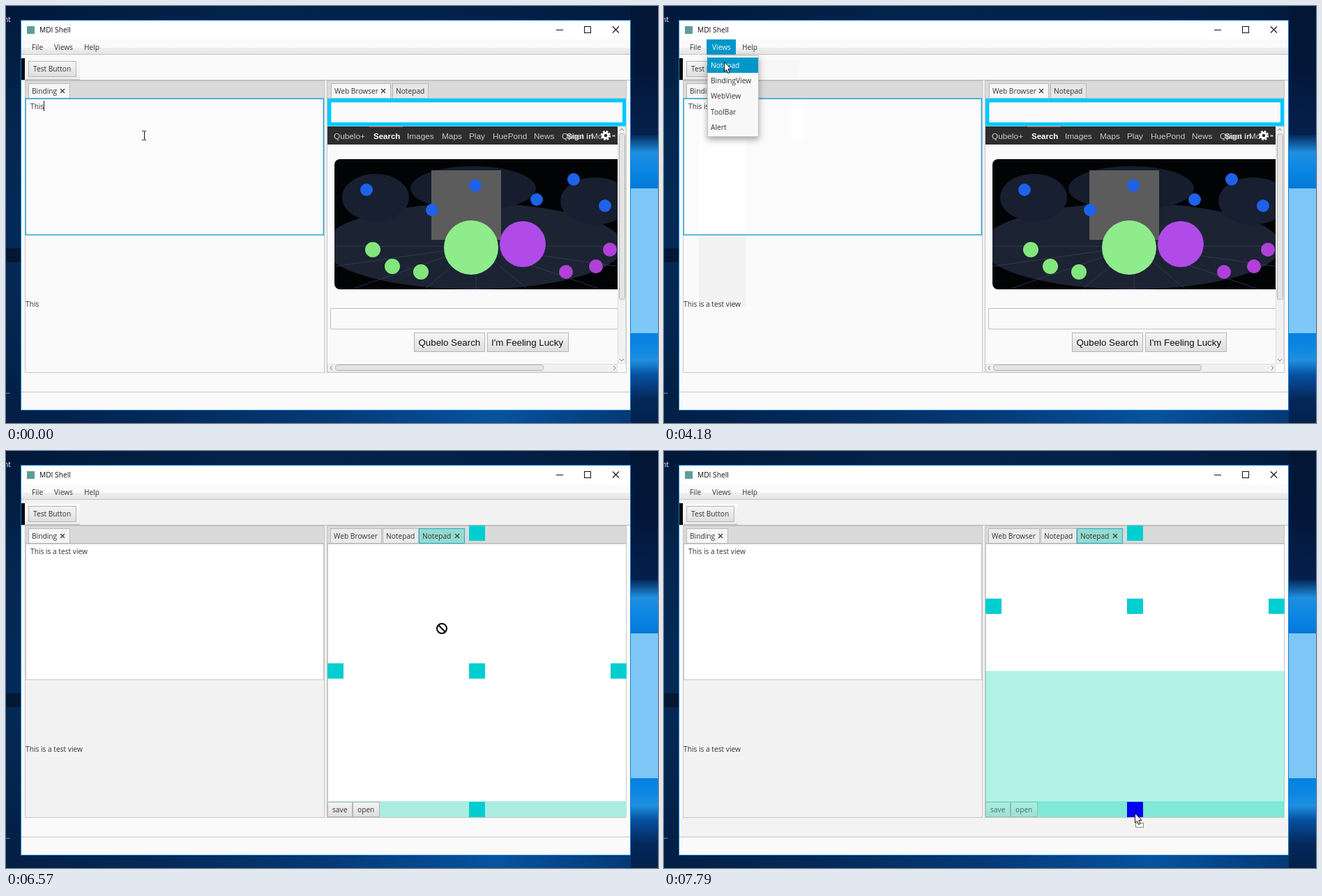
An HTML page with a canvas that plays this animation: 935x599 px, repeating every 8 s.

```html
<!DOCTYPE html>
<html lang="en">
<head>
<meta charset="utf-8">
<title>MDI Shell</title>
<style>
html, body { margin: 0; width: 100%; height: 100%; overflow: hidden; background: #031a3c; }
canvas { display: block; width: 935px; height: 599px; }
</style>
</head>
<body>
<canvas id="stage" width="935" height="599"></canvas>
<script>
const ctx = document.getElementById('stage').getContext('2d');
const LOOP = 8000;
const UI = '10.2px "Open Sans", "Noto Sans", sans-serif';
const NAV = '11.8px "Liberation Sans", Arial, sans-serif';
const NAV_BOLD = 'bold 11.5px "Liberation Sans", Arial, sans-serif';
const WEB = '13.3px "Liberation Sans", Arial, sans-serif';
const ACCENT = '#0096c9', LINE = '#b9b9b9', TINT = 'rgba(64,224,195,.4)';
const SENTENCE = 'This is a test view';

const mix = (a, b, k) => a + (b - a) * k;
// Number of steps already taken out of n spread evenly over [from, to].
const steps = (t, from, to, n) =>
  t < from ? 0 : Math.min(n, 1 + Math.floor((t - from) / ((to - from) / (n - 1)) + 1e-6));

function box(x, y, w, h, fill, stroke) {
  if (fill) { ctx.fillStyle = fill; ctx.fillRect(x, y, w, h); }
  if (stroke) {
    ctx.strokeStyle = stroke;
    ctx.lineWidth = 1;
    ctx.strokeRect(x + .5, y + .5, w - 1, h - 1);
  }
}
function disc(x, y, r, fill) {
  oval(x, y, r, r, fill);
}
function oval(x, y, rx, ry, fill) {
  ctx.fillStyle = fill;
  ctx.beginPath();
  ctx.ellipse(x, y, rx, ry, 0, 0, 7);
  ctx.fill();
}
function line(points, color, width = 1) {
  ctx.strokeStyle = color;
  ctx.lineWidth = width;
  ctx.beginPath();
  points.forEach(([x, y]) => ctx.lineTo(x, y));
  ctx.stroke();
}
function label(s, x, y, color = '#333', font = UI) {
  ctx.font = font;
  ctx.fillStyle = color;
  ctx.fillText(s, x, y);
}
function fade(x0, y0, x1, y1, ...colors) {
  const g = ctx.createLinearGradient(x0, y0, x1, y1);
  colors.forEach((c, i) => g.addColorStop(i / (colors.length - 1), c));
  return g;
}
function cross(x, y, r, color, width) {
  line([[x - r, y - r], [x + r, y + r]], color, width);
  line([[x + r, y - r], [x - r, y + r]], color, width);
}
function button(s, x, y, w, h, textX, textY, font) {
  box(x, y, w, h, fade(0, y, 0, y + h, '#f6f6f6', '#dddddd'), '#b4b4b4');
  label(s, textX, textY, font ? '#111' : '#333', font);
}
function tab(s, x, w, fill, closable, stroke = LINE) {
  box(x, 111, w, 22, fill, stroke);
  ctx.save();
  ctx.beginPath();
  ctx.rect(x, 111, w + 1, 22);
  ctx.clip();
  label(s, x + 5, 126);
  if (closable) cross(x + w - 11, 122, 3, '#444', 1.4);
  ctx.restore();
}

function desktop() {
  box(0, 0, 935, 599, '#031a3c');
  box(0, 0, 935, 20, fade(0, 0, 935, 0, '#01183a', '#032349', '#03224a', '#021a3c'));
  box(0, 20, 22, 579, fade(0, 20, 0, 599, '#021a3d', '#03264f', '#042a58', '#03264f', '#021e43'));
  box(0, 348, 22, 20, '#021731');
  box(0, 581, 935, 18, fade(0, 0, 935, 0, '#021f46', '#042a5a', '#053a77', '#0753a0', '#04346c'));
  box(896, 0, 39, 185, fade(0, 0, 0, 185, '#021736', '#04173a', '#04204c'));
  box(896, 185, 39, 77, fade(0, 185, 0, 262, '#04285a', '#1f8fe0', '#0a86e4', '#0578d8'));
  box(896, 468, 39, 62, fade(0, 468, 0, 530, '#0580e0', '#0a86e4', '#1f8fe0', '#0750a0'));
  box(896, 530, 39, 69, fade(0, 530, 0, 599, '#0750a0', '#04285a', '#03214c'));
  box(896, 262, 208, 208, '#7ec7f6');
  label('nt', -3, 23, '#fff');
  label('..', 0, 557, '#fff');
}

function frame(fresh, late) {
  const paper = fresh ? '#f2f2f2' : '#fafafa';
  box(21, 20, 875, 561, '#fafafa', '#1883d7');
  box(22, 21, 873, 27, '#fff');
  box(30, 29, 11, 11, '#5d9c9a');
  label('MDI Shell', 48, 38, '#111');
  line([[789, 34.5], [799, 34.5]], '#111');
  box(829, 29, 10, 10, null, '#111');
  cross(874.5, 34, 4.5, '#111', 1.1);
  box(22, 48, 873, 12, '#fafafa');
  box(22, 60, 873, 9, fade(0, 60, 0, 69, '#eeeeee', '#e6e6e6'));
  box(22, 69, 873, 1, '#c2c2c2');
  label('File', 37, 63);
  label('Views', 69, 63);
  label('Help', 112, 63);

  box(22, 70, 873, 36, paper);
  box(22, 75, 5, 31, '#000');
  box(28, 76, 78, 30, fade(0, 76, 0, 106, '#fafafa', '#ececec'));
  box(28, 105, 78, 1, '#c4c4c4');
  button('Test Button', 32, 79, 69, 23, 39, 94);
  box(22, 106, 873, 1, '#bcbcbc');
  if (late) box(22, 527, 873, 27, '#f3f3f3');
  box(22, 554, 873, 1, '#c6c6c6');
}

function typedLength(t) {
  if (t < 1230) return 4 + Math.round(steps(t, 120, 1100, 8) * 10 / 8);
  if (t < 1660) return 16;
  return [15, 16, 18, 19][steps(t, 1660, 2080, 4) - 1];
}

function bindingPane(t, fresh, grow) {
  const typed = SENTENCE.slice(0, typedLength(t));
  const focused = t < 6270;
  box(27, 107, 430 + grow, 420, fresh ? '#f2f2f2' : '#fafafa', '#c8c8c8');
  box(27, 107, 430 + grow, 26, '#dadada', '#c4c4c4');
  tab('Binding', 32, 60, '#f6f6f6', true);
  box(28, 133, 428 + grow, 196, fresh ? '#fff' : '#fbfbfb', focused ? null : '#c8c8c8');
  ctx.font = UI;
  const reach = ctx.measureText(SENTENCE.slice(0, t < 1230 ? typed.length : Math.max(typed.length, 16))).width;
  if (!fresh && t >= 120) {
    const w = Math.max(0, 36 + reach - 50);
    box(50, 135, w, 193, '#fff');
    box(50, 330, w, 102, '#f2f2f2');
  }
  if (focused) {
    ctx.strokeStyle = '#2ba5d3';
    ctx.lineWidth = 1.5;
    ctx.strokeRect(28.1, 133.1, 427.3, 195.6);
  }
  label(typed, 35, 148);
  label(typed, 28, 432);
  const blinkOn = t < 2510 || Math.floor((t - 2510) / 500) % 2 === 1;
  if (focused && blinkOn) box(Math.round(34.5 + ctx.measureText(typed).width), 136, 1, 15, '#222');
}

function artwork() {
  ctx.save();
  ctx.beginPath();
  ctx.rect(471, 220, 406, 187);
  ctx.clip();
  ctx.beginPath();
  ctx.roundRect(471, 220, 420, 187, 8);
  ctx.fillStyle = '#020305';
  ctx.fill();
  ctx.clip();
  oval(670, 345, 215, 62, '#1c2333');
  oval(530, 275, 48, 34, '#171f30');
  oval(670, 262, 90, 32, '#161d2c');
  oval(845, 280, 50, 34, '#171f30');
  for (let i = 0; i < 9; i++) {
    line([[674, 345], [674 + 260 * Math.cos(i * Math.PI / 8), 345 + 90 * Math.sin(i * Math.PI / 8)]], '#3b4658', .7);
  }
  box(610, 236, 100, 100, '#5c5c5c');
  const orbs = (color, r, points) => points.forEach(([x, y]) => disc(x, y, r, color));
  orbs('#1d62e8', 9, [[517, 264], [611, 293], [673, 258], [761, 278], [814, 249], [859, 287]]);
  orbs('#83e67c', 11, [[526, 350], [554, 374], [595, 382]]);
  orbs('#b040d8', 10, [[803, 382], [846, 374], [866, 350]]);
  disc(667, 347, 39, '#8eec8b');
  disc(741, 342, 33, '#b04be8');
  ctx.restore();
}

function scrollbars() {
  box(877, 173, 12, 341, '#f1f1f1', '#dedede');
  box(461, 514, 416, 12, '#f1f1f1', '#dedede');
  ctx.beginPath();
  ctx.roundRect(879.5, 183.5, 8, 238, 3);
  ctx.roundRect(472.5, 515.5, 298, 8, 3);
  ctx.fillStyle = '#e4e4e4';
  ctx.fill();
  ctx.strokeStyle = '#b0b0b0';
  ctx.lineWidth = 1;
  ctx.stroke();
  line([[880, 179], [883, 176], [886, 179]], '#777');
  line([[880, 507], [883, 510], [886, 507]], '#777');
  line([[468, 517], [465, 520], [468, 523]], '#777');
  line([[871, 517], [874, 520], [871, 523]], '#777');
}

function browserPane() {
  tab('Web Browser', 466, 86, '#f6f6f6', true);
  tab('Notepad', 554, 52, '#e6e6e6');
  box(461, 133, 429, 40, '#fafafa');
  ctx.strokeStyle = '#00c8ff';
  ctx.lineWidth = 5.4;
  ctx.strokeRect(463.7, 135.7, 423, 34.2);
  box(461, 173, 416, 26, '#2d2d2d');
  box(521, 173, 48, 1, '#c9473a');
  const grey = '#ccc';
  [['Qubelo+', 470], ['Images', 575], ['Maps', 625], ['Play', 664], ['HuePond', 698], ['News', 757],
    ['Qpost', 797], ['Mo', 839]].forEach(([s, x]) => label(s, x, 190.5, grey, NAV));
  label('Search', 527, 190.5, '#fff', NAV_BOLD);
  label('Sign in', 804, 190.5, '#ddd', NAV_BOLD);
  ctx.setLineDash([2.4, 2]);
  ctx.strokeStyle = '#fff';
  ctx.lineWidth = 3;
  ctx.beginPath();
  ctx.arc(860, 186, 5.6, 0, 2 * Math.PI);
  ctx.stroke();
  ctx.setLineDash([]);
  ctx.beginPath();
  ctx.arc(860, 186, 3.8, 0, 7);
  ctx.stroke();
  line([[869.5, 186.5], [873.5, 186.5]], '#ccc', 2);
  artwork();
  ctx.beginPath();
  ctx.moveTo(877, 434.5);
  ctx.lineTo(467, 434.5);
  ctx.quadraticCurveTo(465.5, 434.5, 465.5, 436);
  ctx.lineTo(465.5, 464);
  ctx.lineTo(877, 464);
  ctx.strokeStyle = '#bdbdbd';
  ctx.lineWidth = 1;
  ctx.stroke();
  button('Qubelo Search', 585, 469, 102, 28, 591.5, 488, WEB);
  button("I'm Feeling Lucky", 690, 469, 117, 28, 696, 488, WEB);
  scrollbars();
}

function notepadPane(t, pointer) {
  const dragging = t >= 6270;
  const overBar = t >= 7360 && t < 7640;
  tab('Web Browser', 465, 74, '#ebebeb');
  tab('Notepad', 540, 52, '#ebebeb');
  const tabWidth = [0, 10, 44, 66][Math.min(3, steps(t, 5160, 6140, 8))];
  tab('Notepad', 592, tabWidth, dragging ? '#93dbd0' : '#fafafa', true, dragging ? '#2ba9cf' : LINE);
  box(461, 133, 429, 371, '#fff', '#c8c8c8');
  box(462, 503, 428, 23, '#f2f2f2');
  if (dragging) box(462, 503, 428, 23, TINT);
  button('save', 461, 504, 36, 22, 468, 519);
  button('open', 497, 504, 39, 22, 504, 519);
  if (!dragging || overBar) return;

  const split = t >= 7640;
  if (split) box(461, 316, 429, 210, TINT);
  const middle = split ? 212 : 305;
  const spots = [[664, 107], [461, middle], [664, middle], [867, middle], [664, 504]];
  spots.forEach(([x, y]) => {
    const hot = pointer.x >= x && pointer.x < x + 23 && pointer.y >= y && pointer.y < y + 23;
    box(x, y, 23, 22, hot && split ? '#0000fe' : '#00ced1');
  });
}

function dropBar() {
  box(22, 527, 873, 33, '#000');
  box(24, 529, 871, 25, '#7bfb7b');
  box(22, 554, 873, 4, '#fff');
}

function popup(hover) {
  box(61, 48, 42, 22, ACCENT);
  label('Views', 69, 63, '#fff');
  ctx.save();
  ctx.shadowColor = 'rgba(0,0,0,.35)';
  ctx.shadowBlur = 9;
  ctx.shadowOffsetY = 4;
  box(62, 71, 74, 117, '#f8f8f8');
  ctx.restore();
  box(62, 71, 74, 117, null, '#c4c4c4');
  if (hover) box(62, 74, 73, 22, ACCENT);
  ['Notepad', 'BindingView', 'WebView', 'ToolBar', 'Alert'].forEach((s, i) =>
    label(s, 67, 89 + i * 22.2, hover && !i ? '#fff' : '#333'));
}

function pointerAt(t) {
  const at = (x, y, kind = 'arrow') => ({ x, y, kind });
  if (t < 2790) return at(198, 186, 'beam');
  if (t < 3890) {
    const k = steps(t, 2790, 3610, 7) / 7;
    const y = mix(186, 60, k);
    return at(mix(198, 82, k), y, y > 133 ? 'beam' : 'arrow');
  }
  if (t < 5160) {
    const k = steps(t, 3890, 4180, 3) / 3;
    return at(mix(82, 86, k), mix(60, 80, k));
  }
  if (t < 6270) {
    const k = (steps(t, 5160, 6140, 8) - 1) / 7;
    return at(mix(86, 622, k), mix(80, 122, k));
  }
  if (t < 7360) {
    const i = steps(t, 6270, 7240, 8);
    return i <= 3
      ? at(mix(622, 625, (i - 1) / 2), mix(128, 255, (i - 1) / 2), 'denied')
      : at(mix(625, 673, (i - 3) / 5), mix(255, 498, (i - 3) / 5), 'denied');
  }
  if (t < 7640) return at(673, 528, 'drop');
  return t < 7790 ? at(674, 524, 'drop') : at(675, 520, 'drop');
}

function drawPointer({ x, y, kind }) {
  ctx.save();
  ctx.translate(Math.round(x), Math.round(y));
  if (kind === 'beam') {
    line([[-3, -6.5], [-1, -6.5], [0, -5.5], [1, -6.5], [3, -6.5]], '#111');
    line([[-3, 6.5], [-1, 6.5], [0, 5.5], [1, 6.5], [3, 6.5]], '#111');
    line([[.5, -6], [.5, 6]], '#111');
  } else if (kind === 'denied') {
    disc(0, 0, 8.5, '#fff');
    ctx.strokeStyle = '#000';
    ctx.lineWidth = 2;
    ctx.beginPath();
    ctx.arc(0, 0, 7, 0, 7);
    ctx.moveTo(-5, -5);
    ctx.lineTo(5, 5);
    ctx.stroke();
  } else {
    if (kind === 'drop') {
      box(1, 14, 12, 7, '#fff');
      ctx.setLineDash([1, 1]);
      box(1, 14, 12, 7, null, '#111');
      ctx.setLineDash([]);
    }
    ctx.beginPath();
    [[.5, .5], [.5, 14], [3.5, 11.5], [5.8, 16.5], [8, 15.5], [5.8, 10.5], [10, 10.3]]
      .forEach(([px, py]) => ctx.lineTo(px, py));
    ctx.closePath();
    ctx.fillStyle = '#fff';
    ctx.fill();
    ctx.strokeStyle = '#111';
    ctx.lineWidth = 1;
    ctx.stroke();
  }
  ctx.restore();
}

function draw(t) {
  const fresh = t >= 5160;
  const overBar = t >= 7360 && t < 7640;
  const pointer = pointerAt(t);
  const shift = overBar ? 1 : 0;
  desktop();
  frame(fresh, t >= 7640);
  box(457, 107, 4, 420, '#efefef');
  bindingPane(t, fresh, shift);
  ctx.save();
  ctx.translate(shift, 0);
  box(460, 107, 430, 420, fresh ? '#f2f2f2' : '#fafafa', '#c8c8c8');
  box(460, 107, 430, 26, '#dadada', '#c4c4c4');
  if (fresh) notepadPane(t, pointer);
  else browserPane();
  ctx.restore();
  if (overBar) dropBar();
  if (t >= 3470 && !fresh) {
    box(136, 78, 58, 28, '#f7f7f7');
    box(183, 135, 18, 58, '#fff');
    popup(pointer.y >= 73);
  }
  drawPointer(pointer);
}

function tick(now) {
  draw(now % LOOP);
  requestAnimationFrame(tick);
}
draw(0);
requestAnimationFrame(tick);
</script>
</body>
</html>
```
